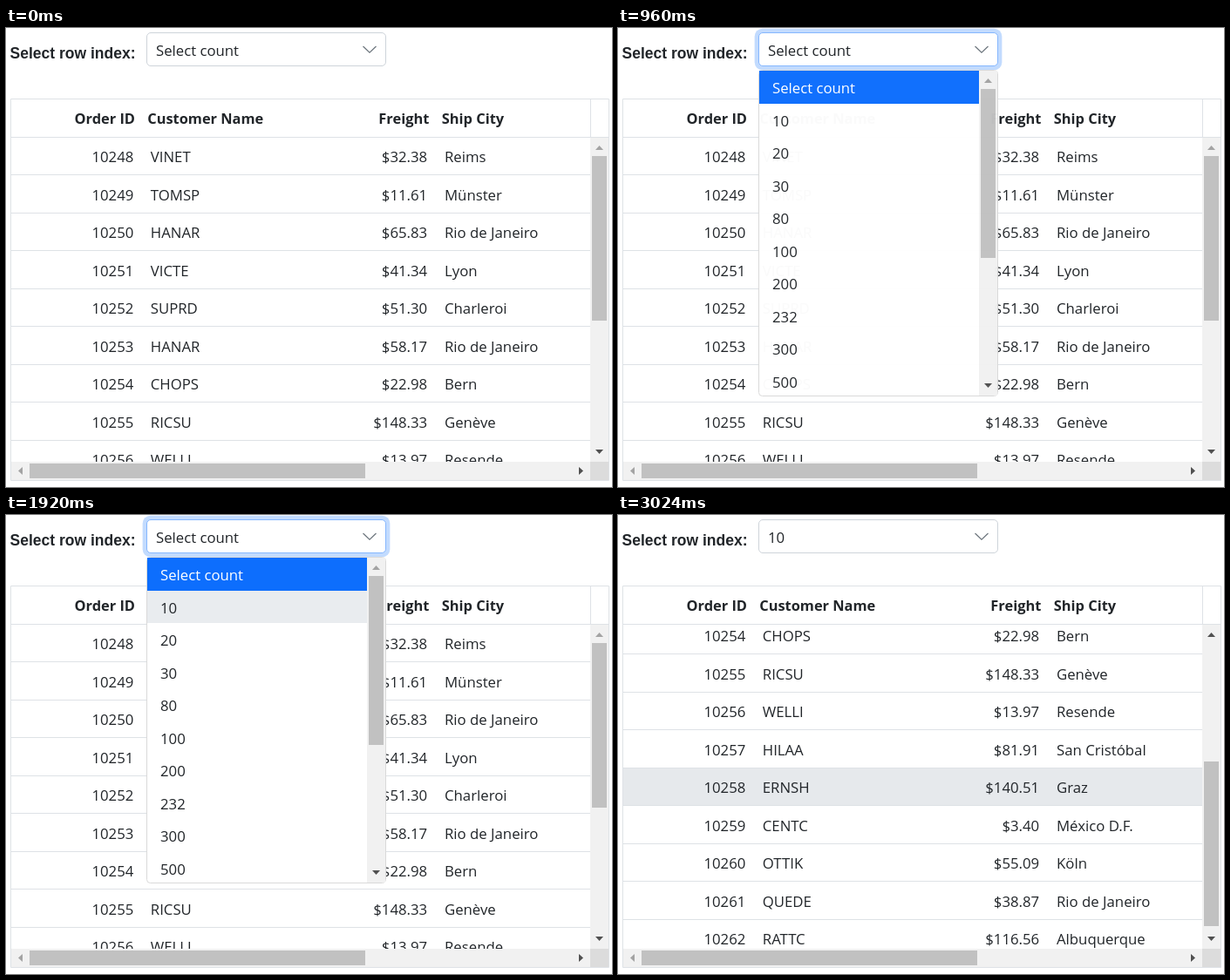
Recreate the animation shown at these times as an HTML page. Size 695 by 527 pixels, loop 3480 ms.

```html
<!DOCTYPE html>
<html lang="en">
<head>
<meta charset="utf-8">
<title>Select a grid row</title>
<style>
  html, body { margin: 0; width: 100%; height: 100%; overflow: hidden; background: #fff; }
  svg { display: block; width: 100%; height: 100%; }
  text { font: 16.75px "Open Sans", "Noto Sans", sans-serif; fill: #212529; }
  .head { font-size: 16.4px; font-weight: 700; }
  .label { font: bold 17.5px "Liberation Sans", Arial, sans-serif; }
  .end { text-anchor: end; }
  .white { fill: #fff; }
  .line { fill: none; stroke: #dee2e6; }
</style>
</head>
<body>
<svg id="stage" viewBox="0 0 695 527">
  <defs><clipPath id="body"><rect x="6" y="126" width="664" height="372"/></clipPath></defs>
  <g id="scene"></g>
</svg>
<script>
const LOOP = 3480, PITCH = 43.5, ITEM = 37.5, BLUE = '#0d6efd';

const orders = [
  ['VINET', '32.38', 'Reims'], ['TOMSP', '11.61', 'Münster'],
  ['HANAR', '65.83', 'Rio de Janeiro'], ['VICTE', '41.34', 'Lyon'],
  ['SUPRD', '51.30', 'Charleroi'], ['HANAR', '58.17', 'Rio de Janeiro'],
  ['CHOPS', '22.98', 'Bern'], ['RICSU', '148.33', 'Genève'],
  ['WELLI', '13.97', 'Resende'], ['HILAA', '81.91', 'San Cristóbal'],
  ['ERNSH', '140.51', 'Graz'], ['CENTC', '3.40', 'México D.F.'],
  ['OTTIK', '55.09', 'Köln'], ['QUEDE', '38.87', 'Rio de Janeiro'],
  ['RATTC', '116.56', 'Albuquerque']
];
const counts = ['Select count', 10, 20, 30, 80, 100, 200, 232, 300, 500];

// Each state lasts until the next start time.
const states = [
  { start: 0,    popup: 0 },
  { start: 900,  popup: .58, focus: true },
  { start: 960,  popup: .98, focus: true },
  { start: 1380, popup: 1, focus: true, hover: 1 },
  { start: 2280, popup: .2, chosen: 1 },
  { start: 2340, popup: 0, chosen: 1 }
];

const text = (x, y, s, cls = '') => `<text x="${x}" y="${y}" class="${cls}">${s}</text>`;
const rect = (x, y, w, h, fill) => `<rect x="${x}" y="${y}" width="${w}" height="${h}" fill="${fill}"/>`;
const line = d => `<path class="line" d="${d}"/>`;
const arrow = (x, y, angle, active) =>
  `<path d="M-4.5 2.5L0 -2.5L4.5 2.5Z" fill="${active ? '#505050' : '#a3a3a3'}" transform="translate(${x} ${y}) rotate(${angle})"/>`;

function selectBox({ focus, chosen = 0 }) {
  const box = 'x="161.5" y="5.5" width="274" height="38" rx="4.5"';
  const ring = focus
    ? '<rect x="156.65" y=".65" width="283.7" height="47.7" rx="9" fill="#c2dbfe"/>' : '';
  return text(4.6, 35, 'Select row index:', 'label') + ring +
    `<rect ${box} fill="#fff" stroke="${focus ? '#86b7fe' : '#ced4da'}"/>` +
    text(172, 32, counts[chosen]) +
    '<path d="M409.5 21L417 28.2L424.5 21" fill="none" stroke="#6c757d" stroke-width="1.2"/>';
}

function grid({ chosen }) {
  const scroll = chosen ? 270 : 0;
  const rows = orders.map(([customer, freight, city], i) => {
    const bottom = Math.floor(168.5 + PITCH * i - scroll);
    const y = bottom - 14;
    return (chosen && i === 10 ? rect(6, bottom - 42, 664, 42, '#e6e9ec') : '') +
      line(`M6 ${bottom + .5}H670`) +
      text(146.3, y, 10248 + i, 'end') + text(165.8, y, customer) +
      text(483.2, y, '$' + freight, 'end') + text(503, y, city);
  }).join('');
  return text(148, 110, 'Order ID', 'head end') + text(162.2, 110, 'Customer Name', 'head') +
    text(485.3, 110, 'Freight', 'head end') + text(499.8, 110, 'Ship City', 'head') +
    `<g clip-path="url(#body)">${rows}</g>` +
    rect(670, 126, 21, 372, '#f1f1f1') + rect(672, chosen ? 283 : 147, 17, 189, '#c1c1c1') +
    arrow(680.5, 137.5, 0, chosen) + arrow(680.5, 486.5, 180, true) +
    rect(6, 498, 664, 21, '#f1f1f1') + rect(27, 500, 385, 17, '#c1c1c1') +
    arrow(16.5, 508.5, -90, false) + arrow(659.5, 508.5, 90, true) +
    rect(670, 498, 21, 21, '#dcdcdc') +
    line('M5.5 81.5H691.5V519.5H5.5ZM6 125.5H691M670.5 82V125');
}

function popup({ popup: opacity, hover, chosen = 0 }) {
  if (!opacity) return '';
  const top = i => Math.round(49.3 + ITEM * i);
  const items = counts.map((label, i) => {
    const fill = i === chosen ? BLUE : i === hover ? '#e9ecef' : '';
    return (fill ? rect(162, top(i), 252, top(i + 1) - top(i), fill) : '') +
      text(177, Math.round(75 + ITEM * i), label, i === chosen ? 'white' : '');
  }).join('');
  return `<g opacity="${opacity}">` +
    '<rect x="161.5" y="48.5" width="274" height="374" rx="4" fill="#fff" stroke="#d9d9d9"/>' +
    items + rect(414, 49, 21, 373, '#f1f1f1') + rect(416, 70, 17, 194, '#c1c1c1') +
    arrow(424.5, 60.5, 0, false) + arrow(424.5, 410.5, 180, true) + '</g>';
}

const scene = document.getElementById('scene');
let shown;
function tick() {
  const t = performance.now() % LOOP;
  const state = states.findLast(s => t >= s.start);
  if (state !== shown) {
    shown = state;
    scene.innerHTML = selectBox(state) + grid(state) + popup(state);
  }
  requestAnimationFrame(tick);
}
tick();
</script>
</body>
</html>
```
